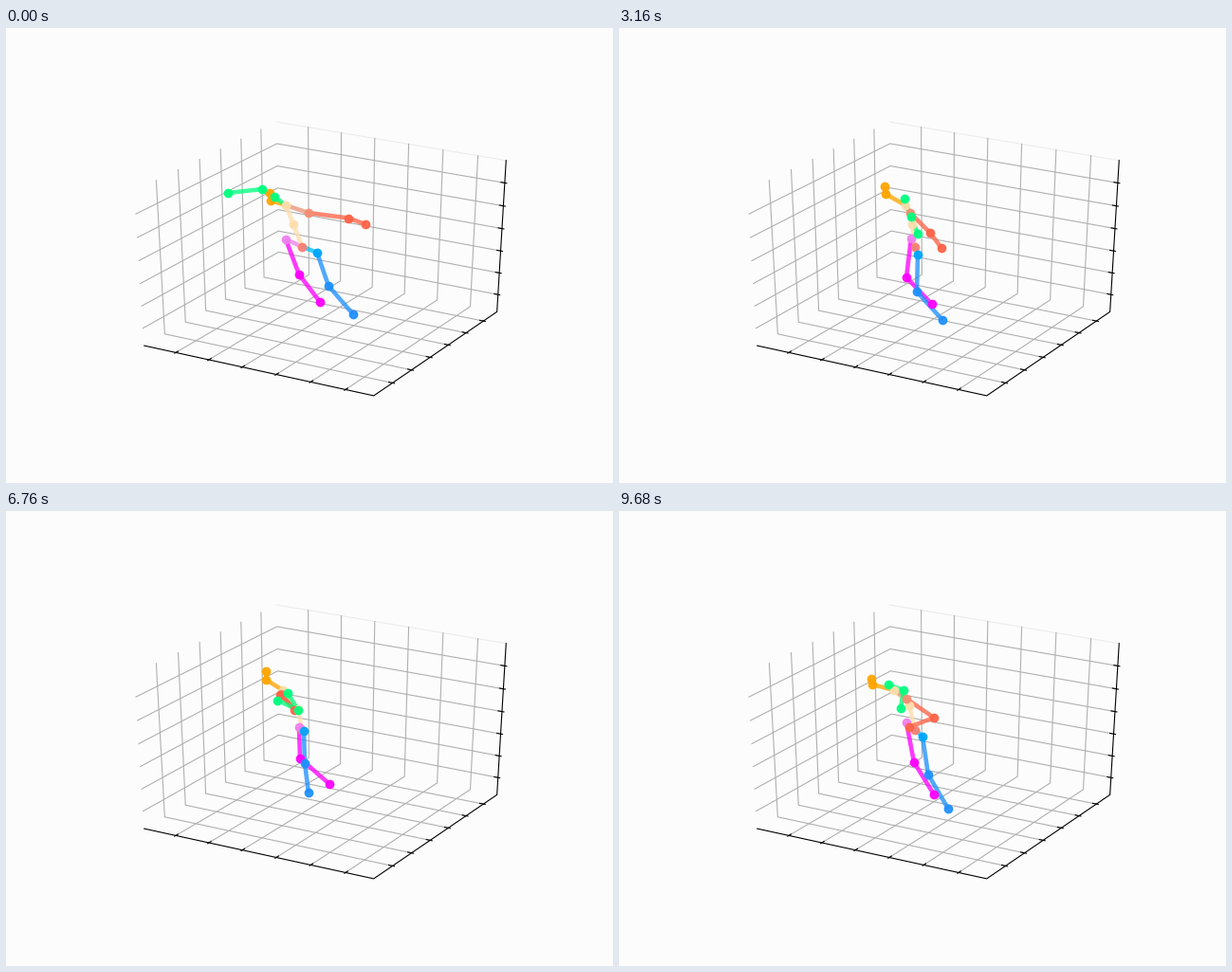
Recreate the animation shown at these times as a matplotlib script. Size 640 by 480 pixels, loop 9.72 s.

```python
import numpy as np
import matplotlib.pyplot as plt
from matplotlib.animation import FuncAnimation

W, H, DPI = 640, 480, 100
FRAMES, STEP = 243, 40
BG = "#fcfcfc"

fig = plt.figure(figsize=(W / DPI, H / DPI), dpi=DPI, facecolor=BG)
ax = fig.add_axes([0, 0, 1, 1])
ax.set_xlim(0, W)
ax.set_ylim(H, 0)
ax.axis("off")

# ---- the empty 3D box, seen in perspective ----
ELEV, AZIM, DIST = np.radians(30), np.radians(-60), 10
HALF = 25 / 48
CENTER, SCALE = (334.7, 238.35), (2681, 1788)


def project(x, y, z):
    ce, se, ca, sa = np.cos(ELEV), np.sin(ELEV), np.cos(AZIM), np.sin(AZIM)
    right = -sa * x + ca * y
    up = -se * ca * x - se * sa * y + ce * z
    depth = DIST - (ce * ca * x + ce * sa * y + se * z)
    return CENTER[0] + SCALE[0] * right / depth, CENTER[1] - SCALE[1] * up / depth


def line3d(points, color, z):
    xs, ys = zip(*(project(*p) for p in points))
    ax.plot(xs, ys, color=color, lw=0.8, zorder=z)


h = HALF
OUT, IN = 1 / 120, 1 / 60
GRID, INK = "#b0b0b0", "black"

line3d([(-h, h, h), (h, h, h)], "#ececec", 0)
for i in range(6):
    t = -0.372 + 0.154 * i
    v = -0.397 + 0.154 * i
    line3d([(t, -h, -h), (t, h, -h), (t, h, h)], GRID, 1)
    line3d([(h, t, -h), (-h, t, -h), (-h, t, h)], GRID, 1)
    line3d([(-h, -h, v), (-h, h, v), (h, h, v)], GRID, 1)
    line3d([(t, -h - OUT, -h), (t, -h + IN, -h)], INK, 2)
    line3d([(h + OUT, t, -h), (h - IN, t, -h)], INK, 2)
    line3d([(h + OUT, h, v), (h - IN, h, v)], INK, 2)
line3d([(-h, -h, -h), (h, -h, -h), (h, h, -h), (h, h, h)], INK, 2)

# ---- joint paths: poses at key times (s), eased in between ----
KEYS = (0, 1.24, 3.16, 5.52, 6.76, 8.16, 9.68)
clock = np.arange(FRAMES) * STEP / 1000


def ease(times, values):
    """Monotone cubic curve through the values, sampled at every frame."""
    gap = np.diff(times)
    rate = np.diff(values) / gap
    slope = np.zeros(len(times))
    slope[0], slope[-1] = rate[0], rate[-1]
    for i in range(1, len(rate)):
        a, b = rate[i - 1], rate[i]
        if a * b > 0:
            slope[i] = 2 * a * b / (a + b)
    k = np.clip(np.searchsorted(times, clock, side="right") - 1, 0, len(gap) - 1)
    g = gap[k]
    u = (clock - times[k]) / g
    return ((1 + 2 * u) * (1 - u) ** 2 * values[k] + u * (1 - u) ** 2 * g * slope[k]
            + u * u * (3 - 2 * u) * values[k + 1] + u * u * (u - 1) * g * slope[k + 1])


paths = {}


def joint(name, *poses, extra=None):
    keys = dict(zip(KEYS, poses))
    keys.update(extra or {})
    times = np.array(sorted(keys), float)
    pts = np.array([keys[t] for t in sorted(keys)], float)
    paths[name] = np.column_stack([ease(times, pts[:, 0]), ease(times, pts[:, 1])])


joint("root", *[(312, 230.5)] * 7)
joint("hip_a", (295, 223), (298, 223), (308, 222), (310, 226), (309, 228), (312, 224), (303, 223))
joint("knee_a", (309, 260), (303, 262), (303, 263), (312, 259), (310, 261), (314, 259), (311, 265))
joint("foot_a", (331, 289), (321, 291), (329.5, 291), (337, 289), (341, 288), (342, 290), (332, 299),
      extra={4.6: (343, 289)})
joint("hip_b", (328, 237), (325, 237), (315, 239), (313, 234), (314, 232), (311, 237), (320, 238))
joint("knee_b", (340, 272), (333, 274), (314, 278), (316, 267), (315, 266), (312, 274), (326, 278))
joint("foot_b", (366, 302), (363, 304), (341, 308), (326, 296), (319, 297), (323, 308), (347, 314),
      extra={4.4: (334, 312), 9.02: (340, 318)})
joint("spine", (303, 207), (304, 208), (309, 207), (306, 208), (308, 209), (308, 208), (306, 205))
joint("neck", (295, 187), (291, 188), (302, 187), (288, 187), (292, 189), (291, 184), (290, 189))
joint("nose", (279, 182), (276, 183), (281, 175), (270, 176), (274, 178), (271, 174), (267, 183))
joint("head", (278, 174), (275, 173), (280, 167), (272, 166), (274, 169), (271, 165.5), (265.5, 177),
      extra={0.6: (277, 169), 4.8: (271, 164)})
joint("shoulder_r", (319, 195), (310, 197), (307, 195), (290, 191), (290, 193), (292, 191), (303, 198))
joint("elbow_r", (361, 200.5), (347, 210), (328, 216), (301, 214), (304, 209.5), (305, 215), (332, 218))
joint("wrist_r", (379, 207), (355, 232), (340, 232), (274, 202), (289, 193.5), (282, 213.5), (306, 228),
      extra={0.3: (382, 212), 5.02: (263, 202)})
joint("shoulder_g", (283, 178), (283, 183), (301, 180), (293, 187), (297, 192), (299, 183), (283.5, 183))
joint("elbow_g", (270, 170), (283, 186), (308, 199), (305, 205), (308, 210), (316, 198), (300, 189))
joint("wrist_g", (234, 174), (264, 194), (315, 217), (290, 197), (286, 199.5), (300, 194), (297, 208),
      extra={0.3: (232, 177), 1.04: (253, 190)})

BONES = [
    ("root", "hip_a", "violet"), ("hip_a", "knee_a", "magenta"), ("knee_a", "foot_a", "magenta"),
    ("root", "hip_b", "deepskyblue"), ("hip_b", "knee_b", "dodgerblue"), ("knee_b", "foot_b", "dodgerblue"),
    ("root", "spine", "navajowhite"), ("spine", "neck", "navajowhite"),
    ("neck", "nose", "orange"), ("nose", "head", "orange"),
    ("neck", "shoulder_r", "darksalmon"), ("shoulder_r", "elbow_r", "tomato"), ("elbow_r", "wrist_r", "tomato"),
    ("neck", "shoulder_g", "springgreen"), ("shoulder_g", "elbow_g", "springgreen"),
    ("elbow_g", "wrist_g", "springgreen"),
]
DOTS = {
    "root": "salmon", "spine": "navajowhite", "neck": "navajowhite",
    "hip_a": "violet", "knee_a": "magenta", "foot_a": "magenta",
    "hip_b": "#00a5ff", "knee_b": "dodgerblue", "foot_b": "dodgerblue",
    "nose": "orange", "head": "orange",
    "shoulder_r": "#f58e74", "elbow_r": "tomato", "wrist_r": "tomato",
    "shoulder_g": "#00ff7f", "elbow_g": "#00ff7f", "wrist_g": "#00ff7f",
}

lines = [ax.plot([], [], color=c, lw=3.3, alpha=0.77, solid_capstyle="butt", zorder=3)[0]
         for _, _, c in BONES]
dots = {name: ax.plot([], [], "o", color=c, ms=6, alpha=0.93, zorder=4)[0]
        for name, c in DOTS.items()}


def draw(i):
    for line, (a, b, _) in zip(lines, BONES):
        line.set_data(*zip(paths[a][i], paths[b][i]))
    for name, dot in dots.items():
        x, y = paths[name][i]
        dot.set_data([x], [y])
    return lines + list(dots.values())


anim = FuncAnimation(fig, draw, frames=FRAMES, interval=STEP, repeat=True, repeat_delay=0)
plt.show()
```
